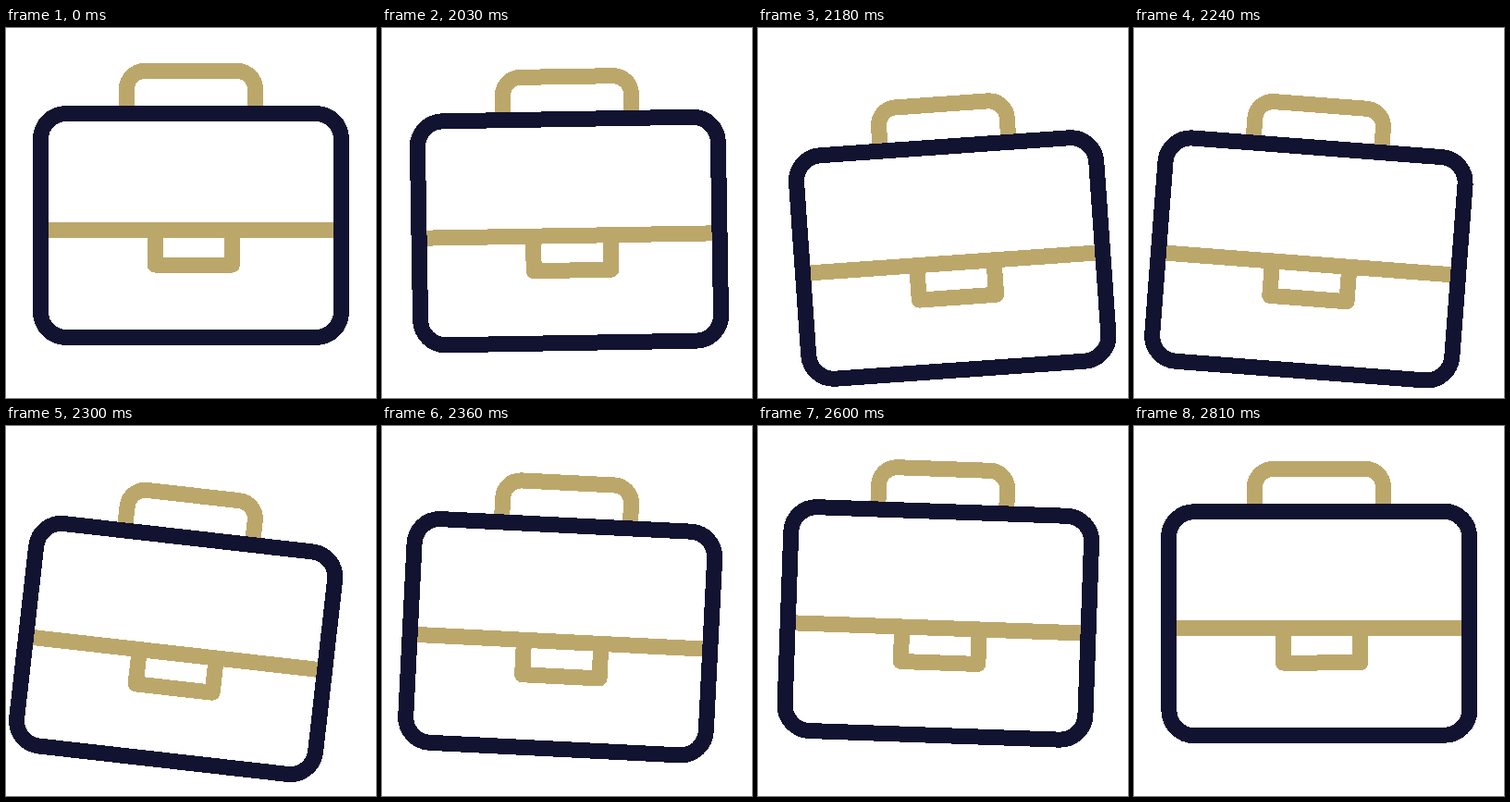
These frames come from a looping animation (400 by 400 pixels, 2.84 s). An HTML page:

```html
<!DOCTYPE html>
<html lang="en">
<head>
<meta charset="utf-8">
<title>Swinging briefcase</title>
<style>
  html, body { margin: 0; width: 100%; height: 100%; overflow: hidden; background: #fff; }
  svg { display: block; width: 100%; height: 100%; }
  .case { fill: none; stroke-width: 17; stroke-linejoin: round; shape-rendering: crispEdges; }
  .gold { stroke: #bca76b; }
  .navy { stroke: #121330; }
</style>
</head>
<body>
<svg viewBox="0 0 400 400">
  <g id="case" class="case">
    <path class="gold" d="M130.5 92.5V66a19.5 19.5 0 0 1 19.5-19.5H250a19.5 19.5 0 0 1 19.5 19.5V92.5"/>
    <path class="gold" d="M38 218.5H362M161 218.5V256H244.5V218.5"/>
    <rect class="navy" x="37.5" y="92.5" width="325" height="242" rx="27.5"/>
  </g>
</svg>
<script>
  const LOOP = 2840, REST = 2030, STEP = 30;
  // [time in ms, value], joined by sine easing
  const drop = [[1964, 0], [2216, 37.7], [2470, 0]];
  const swing = [[1996, 0], [2136, -7], [2279, 6.75], [2466, -3.05],
                 [2620, 2.25], [2735, -0.9], [2830, 0]];
  const bag = document.getElementById('case');

  function valueAt(keys, t) {
    const i = keys.findIndex(key => key[0] > t);
    if (i < 1) return 0;
    const [t0, a] = keys[i - 1], [t1, b] = keys[i];
    return a + (b - a) * (1 - Math.cos(Math.PI * (t - t0) / (t1 - t0))) / 2;
  }

  function draw() {
    const t = performance.now() % LOOP;
    const pose = t < REST ? 0 : REST + Math.floor((t - REST) / STEP) * STEP;
    bag.setAttribute('transform',
      `translate(0 ${valueAt(drop, pose)}) rotate(${valueAt(swing, pose)} 200 68)`);
    requestAnimationFrame(draw);
  }
  draw();
</script>
</body>
</html>
```
